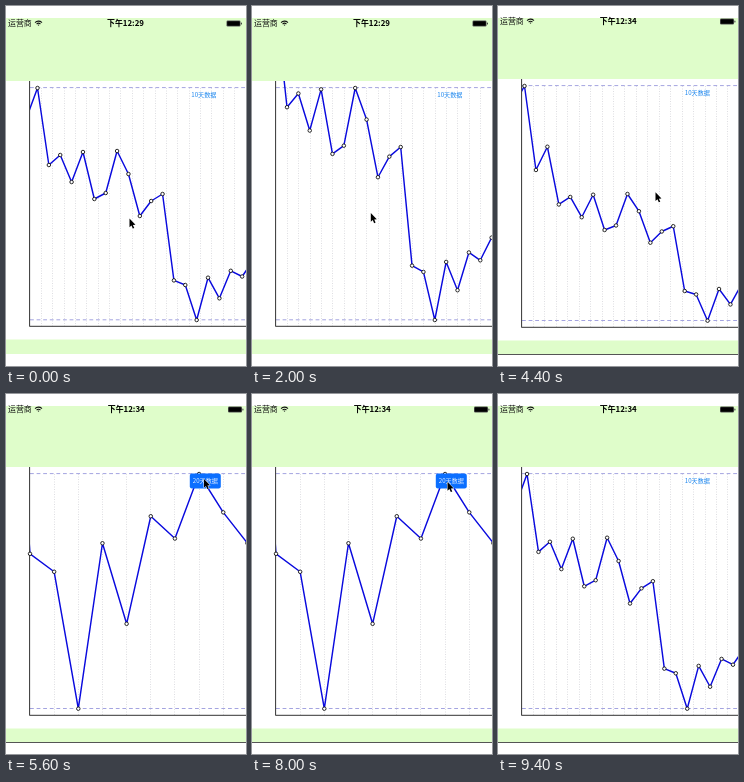
An HTML page with a canvas for the animation above (9600 ms loop, 240 px wide and 360 px high).

```html
<!DOCTYPE html>
<html lang="zh">
<head>
<meta charset="utf-8">
<style>
html, body { margin: 0; width: 100%; height: 100%; overflow: hidden; background: #fff; }
canvas { display: block; width: 240px; height: 360px; }
</style>
</head>
<body>
<canvas id="stage" width="240" height="360"></canvas>
<script>
const ctx = document.getElementById('stage').getContext('2d');
const LOOP = 9600, STEP = 200, LEFT = 24, RIGHT = 240;
const FONT = '"Noto Sans CJK SC", "Noto Sans CJK", sans-serif';
const GREEN = '#dffdca', BLUE = '#0b6fff', INK = '#111';

// the charted series, one value per day
const values = [286, 313, 201, 232, 155, 165, 138, 168, 121, 127, 169, 146, 104,
  119, 126, 39.6, 35, 0, 42.3, 21.7, 49.2, 43.5, 60, 50.2, 42.3];

const early = { clock: '下午12:29', head: 75, low: 314, width: 216, statusY: 17.5, shift: 0 };
const late = { clock: '下午12:34', head: 73, low: 314.7, width: 217.4, statusY: 15.5, shift: 1.5 };

// turning points of the drags; scroll runs from 0 (oldest days) to 1 (newest)
const turns = [
  { at: 0, scroll: 0.468, x: 123.5, y: 212.5 },
  { at: 1200, scroll: 0, x: 174, y: 211 },
  { at: 2600, scroll: 1, x: 83, y: 204.5 },
  { at: 4000, scroll: 0, x: 150, y: 205 },
  { at: 5600, scroll: 1, x: 198, y: 85 },
  { at: 6600, scroll: 0.628, x: 166, y: 178 },
  { at: 8000, scroll: 1, x: 195.5, y: 88 },
  { at: LOOP, scroll: 0.49, x: 150, y: 200 }
];

const ease = p => p * p * (3 - 2 * p);

function poseAt(t) {
  const next = turns.findIndex(k => k.at > t);
  const a = turns[next - 1], b = turns[next];
  const p = ease((t - a.at) / (b.at - a.at));
  const mix = key => a[key] + (b[key] - a[key]) * p;
  return { scroll: mix('scroll'), x: mix('x'), y: mix('y') };
}

function line(x1, y1, x2, y2, color, dash = []) {
  ctx.strokeStyle = color;
  ctx.lineWidth = 1;
  ctx.setLineDash(dash);
  ctx.beginPath();
  ctx.moveTo(x1, y1);
  ctx.lineTo(x2, y2);
  ctx.stroke();
  ctx.setLineDash([]);
}

function box(x, y, w, h, r, color) {
  ctx.fillStyle = color;
  ctx.beginPath();
  ctx.roundRect(x, y, w, h, r);
  ctx.fill();
}

function label(text, x, y, size, color, align, weight = 400) {
  ctx.font = `${weight} ${size}px ${FONT}`;
  ctx.textAlign = align;
  ctx.fillStyle = color;
  ctx.fillText(text, x, y + size * 0.37);
}

function drawStatus({ clock, statusY: y, shift }) {
  label('运营商', 2, y, 7.9, INK, 'left');
  label(clock, 119.5 + shift / 2, y, 7.9, '#000', 'center', 700);

  ctx.strokeStyle = INK;
  ctx.lineWidth = 1.1;
  for (const r of [0.6, 2.6, 4.7]) {
    ctx.beginPath();
    ctx.arc(32.5, y + 2.3, r, -Math.PI * 0.76, -Math.PI * 0.24);
    ctx.stroke();
  }

  const x = 220.5 + shift;
  box(x, y - 2.9, 14, 5.8, 1.2, '#555');
  box(x + 0.7, y - 2.2, 12.6, 4.4, 0.6, '#000');
  box(x + 14.4, y - 0.9, 1, 1.8, 0.5, '#333');
}

function drawChart({ head, low, width }, scroll, days) {
  const top = head + 7, axis = Math.floor(low) + 6.5 + (low > 314 ? 1 : 0);
  const gap = width / (days - 1);
  const offset = scroll * (values.length - days);
  const first = Math.ceil(offset - 1e-6);
  const last = Math.floor(offset + days - 1 + 1e-6);
  const shown = values.slice(first, last + 1);
  const min = Math.min(...shown), max = Math.max(...shown);
  const px = i => LEFT + (i - offset) * gap;
  const py = i => low - (values[i] - min) / (max - min) * (low - top);

  for (let i = 1; i < days; i++) {
    const x = Math.floor(LEFT + i * gap) + 0.5;
    line(x, top, x, axis, '#dedee2', [1, 1.5]);
  }
  for (const y of [top - 0.4, low - 0.2]) line(LEFT, y, RIGHT, y, '#a4a4e0', [3.8, 2.8]);
  line(LEFT - 0.4, head, LEFT - 0.4, axis, '#333');
  line(LEFT - 0.4, axis - 0.2, RIGHT, axis - 0.2, '#333');

  ctx.save();
  ctx.beginPath();
  ctx.rect(LEFT, head, RIGHT - LEFT, axis - head);
  ctx.clip();
  ctx.beginPath();
  values.forEach((_, i) => ctx.lineTo(px(i), py(i)));
  ctx.strokeStyle = '#0a0ade';
  ctx.lineWidth = 1.45;
  ctx.lineJoin = 'round';
  ctx.stroke();
  ctx.restore();

  ctx.fillStyle = '#fff';
  ctx.strokeStyle = INK;
  ctx.lineWidth = 0.9;
  for (let i = first; i <= last; i++) {
    ctx.beginPath();
    ctx.arc(px(i), py(i), 1.75, 0, 7);
    ctx.fill();
    ctx.stroke();
  }
}

function drawButton({ head, shift }, selected) {
  const x = 197.8 + shift, y = head + 13.7;
  if (selected) box(x - 15.5, y - 7.2, 31, 15, 2.2, BLUE);
  label(selected ? '20天数据' : '10天数据', x, y, 6.1, selected ? '#e4f0ff' : '#1683ee', 'center');
}

function drawPointer(x, y) {
  const arrow = new Path2D('M0 0V9.5L2.1 7.6 3.6 11 5.2 10.3 3.7 7 6.5 6.8Z');
  ctx.save();
  ctx.translate(x, y);
  ctx.scale(0.92, 0.92);
  ctx.strokeStyle = '#fff';
  ctx.lineWidth = 1;
  ctx.stroke(arrow);
  ctx.fillStyle = '#000';
  ctx.fill(arrow);
  ctx.restore();
}

function draw(t) {
  const view = t < 4000 ? early : late;
  const zoomed = t >= 5600 && t < 8200;
  const { scroll, x, y } = poseAt(t);
  const foot = view === early ? 333.5 : 334.5;

  box(0, 0, 240, 360, 0, '#fff');
  box(0, 12, 240, view.head - 12, 0, GREEN);
  box(0, foot, 240, 348 - foot, 0, GREEN);
  if (view === late) line(0, 348.5, 240, 348.5, '#555');
  drawStatus(view);
  drawChart(view, scroll, zoomed ? 10 : 20);
  drawButton(view, zoomed);
  if (t < 9400) drawPointer(x, y);
}

const start = performance.now();
function tick() {
  const t = (performance.now() - start) % LOOP;
  draw(Math.floor(t / STEP) * STEP);
  requestAnimationFrame(tick);
}
tick();
</script>
</body>
</html>
```
